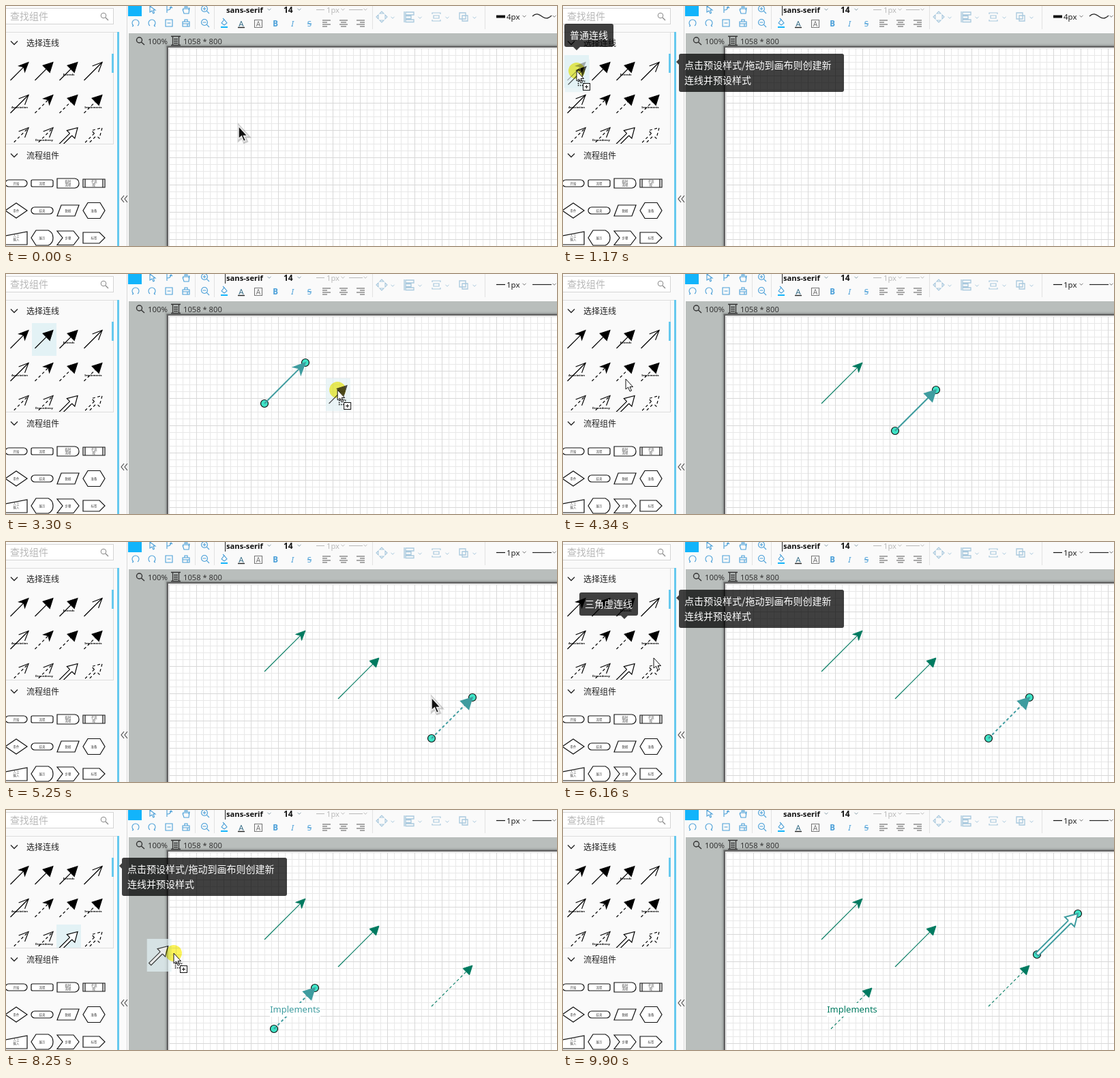
Animation, 808 px wide and 352 px high, one loop 9970 ms. Source, as an HTML page:

```html
<!DOCTYPE html>
<html lang="zh">
<head>
<meta charset="utf-8">
<title>连线组件</title>
<style>
html, body { margin: 0; width: 100%; height: 100%; overflow: hidden; background: #fafafa; }
svg { display: block; }
text { font-family: "Noto Sans", "Noto Sans CJK SC", "Noto Sans CJK", sans-serif; white-space: pre; }
.cn { font-family: "Noto Sans CJK SC", "Noto Sans CJK", sans-serif; }
.glow { mix-blend-mode: multiply; }
</style>
</head>
<body>
<svg id="stage" width="808" height="352" viewBox="0 0 808 352">
  <defs>
    <pattern id="grid" x="239" y="62" width="40" height="40" patternUnits="userSpaceOnUse">
      <path d="M10.5 0V40M20.5 0V40M30.5 0V40M0 10.5H40M0 20.5H40M0 30.5H40" stroke="#e8e8e8"/>
      <path d="M.5 0V40M0 .5H40" stroke="#d8d8d8"/>
    </pattern>
    <clipPath id="list"><rect y="39" width="160" height="163"/></clipPath>
  </defs>
</svg>
<script>
const LOOP = 9970, TEAL = '#3f9c9f', GREEN = '#007a60', BLUE = '#4a9fd8', PALE = '#a9c9de';
const stage = document.getElementById('stage');

function add(parent, tag, attrs, content) {
  const node = document.createElementNS('http://www.w3.org/2000/svg', tag);
  for (const k in attrs) node.setAttribute(k, attrs[k]);
  if (content !== undefined) node.textContent = content;
  parent.appendChild(node);
  return node;
}
const group = (parent, attrs = {}) => add(parent, 'g', attrs);
const rect = (p, x, y, width, height, fill, more) => add(p, 'rect', { x, y, width, height, fill, ...more });
const line = (p, d, stroke, w = 1, more) => add(p, 'path', { d, stroke, 'stroke-width': w, fill: 'none', ...more });
const label = (p, x, y, size, fill, str, more) => add(p, 'text', { x, y, 'font-size': size, fill, ...more }, str);
const chevron = (p, x, y, color = '#8aa0ac', s = 2.5, w = 1) =>
  line(p, `M${x - s} ${y - s / 2}l${s} ${s}l${s} ${-s}`, color, w);
const place = (node, x, y) => node.setAttribute('transform', `translate(${x} ${y})`);
const show = (node, on) => node.setAttribute('visibility', on ? 'visible' : 'hidden');

// A 45 degree arrow whose tip is at (x, y)
function arrow(parent, x, y, len, { kind, dash }, color, s, w = 1) {
  const g = group(parent, { transform: `translate(${x} ${y}) rotate(-45)` });
  const dashes = dash ? { 'stroke-dasharray': '4 3.5' } : {};
  if (kind === 'double') {
    const a = s * .16, b = s * .58;
    add(g, 'path', { d: `M${-len} ${-a}H${-s}V${-b}L0 0L${-s} ${b}V${a}H${-len}Z`, fill: '#fff' });
    line(g, `M${-s} ${-a}H${-len}V${a}H${-s}`, color, w, dashes);
    line(g, `M${-s} ${-a}V${-b}L0 0L${-s} ${b}V${a}`, color, w, dashes);
    return g;
  }
  line(g, `M${-len} 0H${kind === 'open' ? 0 : -s * .7}`, color, w, dashes);
  const half = s * (kind === 'block' ? .52 : .45);
  if (kind === 'open') line(g, `M${-s} ${-half}L0 0L${-s} ${half}`, color, w);
  else add(g, 'path', {
    d: `M0 0L${-s} ${-half}L${kind === 'classic' ? -s * .72 : -s} 0L${-s} ${half}Z`,
    fill: color, stroke: color, 'stroke-width': w * .8
  });
  return g;
}

const kinds = [
  { kind: 'classic' }, { kind: 'block' }, { kind: 'block', text: 'Extends' }, { kind: 'open' },
  { kind: 'open', text: 'Association' }, { kind: 'classic', dash: 1 }, { kind: 'block', dash: 1 },
  { kind: 'block', dash: 1, text: 'Implements' },
  { kind: 'open', dash: 1 }, { kind: 'open', dash: 1, text: 'Dependency' }, { kind: 'double' }, { kind: 'double', dash: 1 }
];
function paletteItem(parent, x, y, type) {
  const wide = type.kind === 'double';
  arrow(parent, x + 31, y + 10.5, 37.5, type, '#000', 14, 1.2);
  if (type.text) label(parent, x + 18, y + 30, 4.2, '#000', type.text, { 'text-anchor': 'middle', 'font-weight': 600 });
}

// Sidebar
const side = group(stage);
rect(side, 0, 0, 178, 352, '#fafafa');
rect(side, -3.5, 3.5, 161, 23, '#fff', { stroke: '#d4d4d4' });
label(side, 6, 20, 14, '#b8b8b8', '查找组件', { class: 'cn' });
add(side, 'circle', { cx: 143, cy: 14, r: 3.8, fill: 'none', stroke: '#888' });
line(side, 'M146 17l4 4', '#888', 1.3);
line(side, 'M0 38.5H163M0 202.5H158M157.5 39V202', '#ddd');
line(side, 'M177.5 0V352', '#d8d8d8');
rect(side, 163, 38, 3, 314, '#66c9ee');
rect(side, 155, 70, 3, 28, '#66c9ee');
const marks = group(side, { 'clip-path': 'url(#list)' });
const hilite = rect(marks, 0, 0, 36, 48, '#e3f2f5');
kinds.forEach((k, i) => paletteItem(marks, 2 + i % 4 * 36, 72 + (i >> 2) * 48, k));
[['选择连线', 54], ['流程组件', 219]].forEach(([name, y]) => {
  chevron(side, 12, y, '#222', 5, 1.3);
  label(side, 30, y + 4.5, 12, '#222', name, { class: 'cn' });
});
line(side, 'M173 278l-4 5l4 5M178 278l-4 5l4 5', '#444', 1.1);

// Flow shapes, each drawn around its own centre
const shapes = [
  ['M-11-5H11A5 5 0 0 1 11 5H-11A5 5 0 0 1-11-5Z', '开始'],
  ['M-14-5H14Q16-5 16-3V3Q16 5 14 5H-14Q-16 5-16 3V-3Q-16-5-14-5Z', '流程'],
  ['M-16-7H10Q16-6 16 0T10 7H-16Z', '临时', '流程'],
  ['M-16-6H16V6H-16ZM-13-6V6M13-6V6', '子流', '程'],
  ['M-16 0L0-11L16 0L0 11Z', '条件'],
  ['M-11-5H11A5 5 0 0 1 11 5H-11A5 5 0 0 1-11-5Z', '结束'],
  ['M-10-8H16L10 8H-16Z', '数据'],
  ['M-16 0L-9-11.5H9L16 0L9 11.5H-9Z', '准备'],
  ['M-16-3L16-9V10H-16Z', '人工', '输入'],
  ['M-16 0L-9-11H9Q16-8 16 0T9 11H-9Z', '展示'],
  ['M-16-10H8L16 0L8 10.5H-16L-8 0Z', '步骤'],
  ['M-16-8H8L16 0L8 8H-16Z', '标签']
];
shapes.forEach(([d, ...words], i) => {
  const g = group(side, { transform: `translate(${15 + i % 4 * 38} ${260 + (i >> 2) * 40})` });
  add(g, 'path', { d, fill: '#fff', stroke: '#111', 'stroke-width': 1.2 });
  words.forEach((w, n) => label(g, 0, 1.6 + (n - (words.length - 1) / 2) * 5.4, 4.4, '#444', w,
    { class: 'cn', 'text-anchor': 'middle' }));
});

// Toolbar
const bar = group(stage);
rect(bar, 178, 0, 630, 40, '#fafafa');
rect(bar, 179, 0, 20, 15, '#12b4fb');
line(bar, 'M277.5 0V34M305.5 0V34M537.5 0V34M702.5 0V34', '#e2e2e2');
const icon = (x, y, d, color = BLUE, w = 1.1) => line(bar, d, color, w, { transform: `translate(${x} ${y})` });
icon(214, 5, 'M-3-5V4L0 2L2 6L3.500 5L2 1H5Z');
icon(239, 5, 'M-3-5V5M-3 1Q3 1 3-4M3-4l-2 2M3-4l2 2');
icon(264, 5, 'M-4 1V-2M-4 1L-5 0L-3 6H4L5-2H4V1M-2 0V-4H0V0M0-4H2V0');
const lens = 'M4.500 0A4.500 4.500 0 1 1-4.500 0A4.500 4.500 0 1 1 4.500 0M3.200 3.200L7 7M-2.500 0H2.500';
icon(291, 4, lens + 'M0-2.500V2.500');
icon(291, 24, lens);
const turn = 'M-3 4A5 5 0 1 1 3 4M-3 4l-2-3M-3 4l-2 1';
icon(190, 25, turn);
icon(214, 25, turn).setAttribute('transform', 'translate(214 25) scale(-1 1)');
icon(239, 25, 'M-5-5H5V5H-5ZM-2.500 0H2.500');
icon(264, 25, 'M-5-2H5V5H-5ZM-2-2V-5H2V-2M-5 1H5M2 1V5');
icon(320, 24, 'M-4 1L0-4L4 1L0 4ZM0-4L-2-6');
icon(320, 25, 'M-5 6H5', '#12b4fb', 2);
const letter = (x, s, color, more) => label(bar, x, 30, 11.5, color, s, { 'text-anchor': 'middle', ...more });
letter(345, 'A', '#3a7089');
icon(345, 25, 'M-5 6.500H5', '#222', 1.4);
icon(370, 26, 'M-5.500-5.500H5.500V5.500H-5.500Z', '#777');
letter(370, 'A', '#777', { 'font-size': 10 });
letter(395, 'B', BLUE, { 'font-weight': 600 });
letter(420, 'I', BLUE, { 'font-style': 'italic' });
letter(445, 'S', BLUE, { 'text-decoration': 'line-through' });
icon(470, 25, 'M-6-4H6M-6-1H1M-6 2H6M-6 5H1', '#555');
icon(495, 25, 'M-6-4H6M-4-1H4M-6 2H6M-4 5H4', '#555');
icon(520, 25, 'M-6-4H6M-1-1H6M-6 2H6M-1 5H6', '#555');
label(bar, 323, 10, 11.2, '#111', 'sans-serif', { 'font-weight': 700 });
label(bar, 407, 10, 12, '#111', '14', { 'font-weight': 700 });
[386, 430].forEach(x => chevron(bar, x, 5));
icon(461, 5, 'M-6 .5H6', '#bbb');
label(bar, 470, 10, 11.2, '#bbb', '1px');
icon(513, 5, 'M-10 .5H10', '#bbb');
[494, 527].forEach(x => chevron(bar, x, 5, '#bbb'));
icon(551, 16, 'M-8 0L-5-3V3ZM8 0L5-3V3ZM0-8L-3-5H3ZM0 8L-3 5H3Z', PALE);
icon(591, 16, 'M-7-8V8M-5-7H7V-3H-5ZM-5-1.500H3V2.500H-5ZM-5 4H7V7.500H-5Z', PALE, 1.3);
icon(631, 16, 'M-6-4V-6H6V-4M-4-2H4V2H-4ZM-6 4V6H6V4', PALE, 1.2);
icon(671, 16, 'M-6-6H3V3H-6ZM-2-2H6V6H-2Z', PALE, 1.3);
[567, 607, 647, 687].forEach(x => chevron(bar, x, 17, PALE));
const caret = line(bar, 'M321.500 0V14', '#222');
const styles = [4, 1].map(px => {
  const g = group(bar);
  line(g, 'M719 15.500H732', '#111', px === 4 ? 4 : 1.2);
  label(g, 734, 20, 11.5, '#222', px + 'px');
  chevron(g, 760, 15, '#777');
  line(g, px === 4 ? 'M772 15C778 9 783 13 787 16S796 18 800 14' : 'M772 15.500H800', '#222', 1.2);
  chevron(g, 804, 15, '#777');
  return g;
});

// Workspace
const work = group(stage);
rect(work, 180, 40, 628, 312, '#b9bebc');
[[9, .07], [5, .16], [3, .3]].forEach(([w, o]) =>
  rect(work, 237, 60, 600, 320, 'none', { stroke: '#222', 'stroke-width': w, 'stroke-opacity': o }));
rect(work, 237, 60, 600, 320, '#fff', { stroke: '#626262', 'stroke-width': 2 });
rect(work, 239, 62, 569, 290, 'url(#grid)');
line(work, 'M199.500 50A4 4 0 1 1 191.500 50A4 4 0 1 1 199.500 50M198.500 53L203 57', '#333', 1.4);
label(work, 208, 55.5, 11.4, '#333', '100%');
line(work, 'M242 44.500H256M242 57.500H256M244.500 44V58M253.500 44V58M246 48.500H252M246 51.500H252M246 54.500H252', '#333', 1.3);
label(work, 260, 55.5, 11.2, '#333', '1058 * 800');

// Each drop: palette index, grab time, drop time, drop point
const drops = [
  { item: 0, grab: 1170, at: 1820, x: 379, y: 130 },
  { item: 1, grab: 2910, at: 3430, x: 487, y: 170 },
  { item: 6, grab: 4470, at: 5120, x: 624, y: 228 },
  { item: 7, grab: 6550, at: 7200, x: 393, y: 261 },
  { item: 10, grab: 8200, at: 9180, x: 695, y: 152 }
];
drops.forEach(d => {
  const type = kinds[d.item];
  d.views = [GREEN, TEAL].map((color, picked) => {
    const g = group(work);
    const size = type.kind === 'double' ? 17 : (type.kind === 'classic' ? 14 : 13) + picked * 3;
    arrow(g, d.x + 60, d.y, 84.85, type, color, size, picked ? 2 : 1.1);
    if (d.item === 7) {
      rect(g, d.x - 6, d.y + 22, 74, 20, '#fff');
      label(g, d.x + 31, d.y + 36, 13, color, type.text, { 'text-anchor': 'middle' });
    }
    if (picked) {
      const dots = [[0, 60], [60, 0]].map(([x, y]) => add(g, 'circle',
        { cx: d.x + x, cy: d.y + y, r: 5.5, fill: '#3fe3c6', stroke: '#111', 'stroke-width': 1.2 }));
      g.prepend(...dots);
    }
    return g;
  });
});

// Tooltips
function tip(x, y, w, h, lines, pointerPath, ...spans) {
  const g = group(stage);
  rect(g, x, y, w, h, '#000', { rx: 3, 'fill-opacity': .75 });
  add(g, 'path', { d: pointerPath, 'fill-opacity': .75 });
  lines.forEach((s, i) => label(g, x + 8, y + 22 + i * 22, 14, '#fff', s, { class: 'cn' }));
  return { g, spans };
}
const tips = [
  tip(170, 70, 242, 56, ['点击预设样式/拖动到画布则创建新', '连线并预设样式'], 'M170 78l-4 4l4 4Z',
    [910, 2510], [5640, 6420], [7590, 9180]),
  tip(2, 26, 72, 34, ['普通连线'], 'M15 60h10l-5 5Z', [910, 2510]),
  tip(24, 74, 86, 34, ['三角虚连线'], 'M85 108h10l-5 5Z', [5640, 6420])
];

// Drag ghosts and pointers
drops.forEach(d => {
  d.ghost = group(stage, { opacity: .7 });
  rect(d.ghost, 0, 0, 36, 48, '#e3f2f5');
  paletteItem(d.ghost, 0, 0, kinds[d.item]);
});
const glow = add(stage, 'circle', { r: 12, fill: '#fbf35a', class: 'glow' });
const shape = 'M0 0V15L3.500 12L6 18L8.500 17L6 11.500H10.500Z';
const dark = group(stage), light = group(stage), carry = group(stage);
add(dark, 'path', { d: shape, fill: 'none', stroke: '#555', 'stroke-opacity': .3, 'stroke-width': 3.5, transform: 'translate(1 1) scale(1.25)' });
add(dark, 'path', { d: shape, fill: '#111', stroke: '#eee', 'stroke-width': 1.2, transform: 'scale(1.25)' });
[light, carry].forEach(g => add(g, 'path', { d: shape, fill: '#fff', stroke: '#111' }));
rect(carry, 2.5, 14.5, 9, 7, 'none', { stroke: '#111', 'stroke-width': 1.6, 'stroke-dasharray': '1.5 1.5' });
rect(carry, 9.5, 18.5, 10, 10, '#fff', { stroke: '#111' });
line(carry, 'M12 23.500H17M14.500 21V26', '#111');

// Pointer path: time, x, y
const path = [
  [0, 341, 176], [130, 341, 176], [780, 60, 110], [1040, 20, 97], [1170, 20, 95], [1690, 374, 130], [1820, 379, 130],
  [2080, 203, 155], [2210, 110, 122], [2340, 80, 106], [2640, 60, 91], [2910, 55, 89], [3170, 470, 167], [3250, 486, 170],
  [3560, 487, 170], [3820, 260, 165], [4080, 110, 156], [4340, 92, 154], [4470, 91, 139], [4860, 604, 224], [4990, 621, 228],
  [5250, 624, 228], [5770, 200, 190], [6160, 133, 170], [6420, 128, 140], [6550, 127, 138], [6940, 389, 258], [7200, 393, 261],
  [7460, 320, 240], [7850, 100, 186], [7980, 77, 177], [8110, 90, 182], [8250, 246, 210], [8640, 640, 166], [8890, 691, 155],
  [9040, 695, 152], [9180, 695, 152], [9510, 760, 290], [9700, 806, 356], [LOOP, 806, 356]
];
function pointer(t) {
  let i = 1;
  while (path[i][0] <= t && i < path.length - 1) i++;
  const [t0, x0, y0] = path[i - 1], [t1, x1, y1] = path[i], k = (t - t0) / (t1 - t0);
  return [x0 + (x1 - x0) * k, y0 + (y1 - y0) * k];
}

const beats = [0, 2510, 2910, 8250, 9040, 9180, 9900, LOOP];
function tick(t) {
  const i = beats.findIndex(b => b > t) - 1;
  let q = beats[i] + Math.floor((t - beats[i]) / 130) * 130;
  if (q > beats[i] && beats[i + 1] - q < 60) q -= 130;
  return q;
}

function render(now) {
  const t = tick(now % LOOP), [x, y] = pointer(t);
  const drag = drops.find(d => t >= d.grab && t < d.at);
  const last = drops.filter(d => t >= d.at).pop();
  drops.forEach(d => {
    show(d.views[0], t >= d.at && d !== last);
    show(d.views[1], d === last);
    show(d.ghost, d === drag);
  });
  show(hilite, drag);
  show(glow, drag);
  if (drag) {
    const [gx, gy] = pointer(t - 20);
    place(drag.ghost, gx - 17, gy - 17);
    place(hilite, 2 + drag.item % 4 * 36, 72 + (drag.item >> 2) * 48);
    place(glow, x, y);
  }
  const mode = drag ? carry : x > 180 ? dark : light;
  [dark, light, carry].forEach(g => show(g, g === mode));
  place(mode, x, y);
  tips.forEach(p => show(p.g, p.spans.some(([a, b]) => t >= a && t < b)));
  show(caret, t >= 910 && t < 9310);
  show(styles[0], t < 1820);
  show(styles[1], t >= 1820);
}

const start = performance.now();
function loop() {
  render(performance.now() - start);
  requestAnimationFrame(loop);
}
loop();
</script>
</body>
</html>
```
